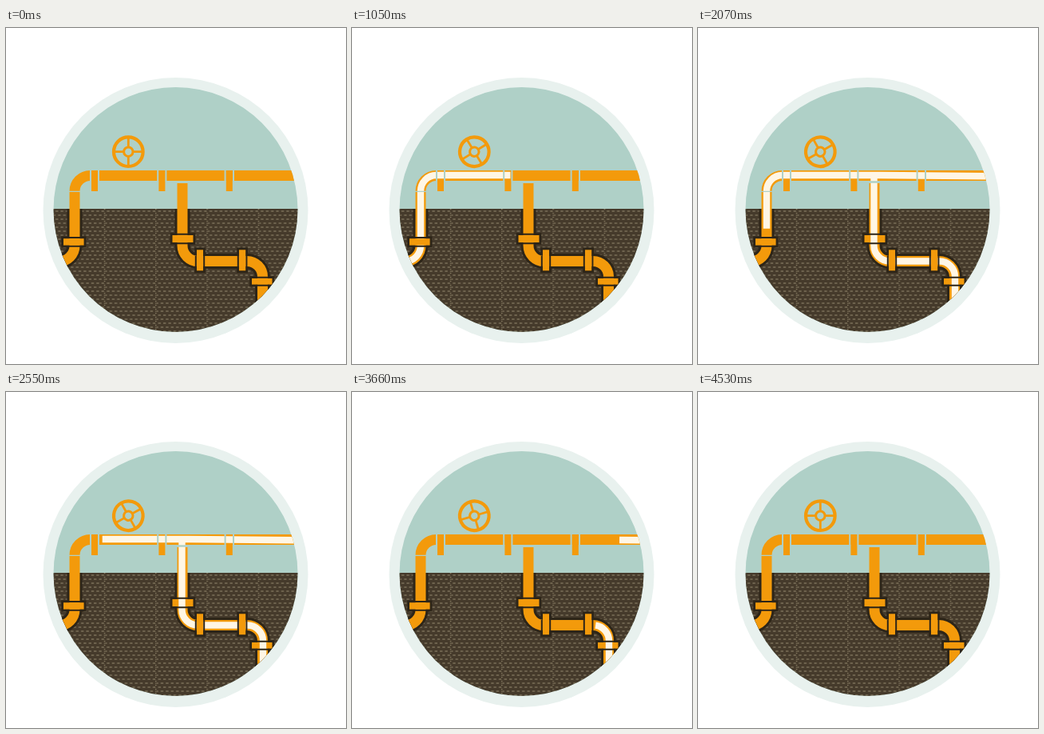
An HTML page for the animation above (4.56 s loop, 426 px wide and 420 px high).

```html
<!DOCTYPE html>
<html lang="en">
<head>
<meta charset="utf-8">
<title>Pipeline</title>
<style>
  html, body { margin: 0; width: 100%; height: 100%; overflow: hidden; background: #fff; }
  svg { display: block; width: 426px; height: 420px; }
  .pipe { fill: none; stroke: #f39a0b; stroke-width: 13; }
  .edge { fill: none; stroke: #2d2518; stroke-width: 19; }
  .rim { fill: #2d2518; }
  .flange { fill: #f39a0b; }
  .water { fill: none; stroke: #fff6e5; stroke-width: 8.4; }
  .air { stroke: #afd0c7; }
  .dark { stroke: #2d2518; }
  .air, .dark { fill: none; stroke-width: 2; }
  #wheel { fill: none; stroke: #f39a0b; }
</style>
</head>
<body>
<svg viewBox="0 0 426 420">
  <defs>
    <clipPath id="disc"><circle cx="212.5" cy="227" r="153"/></clipPath>
    <clipPath id="below"><rect y="226" width="426" height="194"/></clipPath>
    <pattern id="soil" x="60.5" y="227" width="64.3" height="10" patternUnits="userSpaceOnUse">
      <rect width="65" height="10" fill="#453a2b"/>
      <path d="M1.5 2H64M-1.7 7H64" stroke="#978b70" stroke-width="1.1" stroke-dasharray="3.4 3"/>
      <path d="M62.3 4.5h1.4M62.3 9.5h1.4" stroke="#978b70"/>
    </pattern>
    <path id="left" d="M56 292H66A20 20 0 0 0 86 272V204"/>
    <path id="branch" d="M221 194V272A19.5 19.5 0 0 0 240.5 291.5H302A19.5 19.5 0 0 1 321.5 311V345"/>
  </defs>

  <circle cx="212.5" cy="228" r="166" fill="#e8f1ee"/>
  <g clip-path="url(#disc)">
    <rect width="426" height="420" fill="#afd0c7"/>
    <rect y="226" width="426" height="194" fill="url(#soil)"/>
    <g class="edge" clip-path="url(#below)">
      <use href="#left"/><use href="#branch"/>
    </g>
    <g id="rims" class="rim"></g>
    <g class="pipe">
      <use href="#left"/><use href="#branch"/>
      <path d="M86 204A19.5 19.5 0 0 1 105.5 184.5H370"/>
    </g>
    <g id="open" class="flange"></g>
    <path id="main" class="water" d="M66 292A20 20 0 0 0 86 272V204A19.5 20 0 0 1 105.5 184H228L362 185.2"/>
    <path id="side" class="water" d="M220.5 184V272A19.5 19.5 0 0 0 240 291.5H302.5A19.5 19.5 0 0 1 322 311V345"/>
    <path class="air" d="M106 177.5V191.5M116 177.5V191.5M190.2 177.5V191.5M200.4 177.5V191.5M274.6 177.5V191.5M285 177.5V191.5"/>
    <path class="air" d="M79 204.3H93" stroke-width="1.2" style="stroke-width:1.2"/>
    <path class="air" d="M214 192.5H228" style="stroke-width:2.6"/>
    <path class="dark" d="M79 262H93M79 272.8H93M214 257.8H228M214 269.2H228M314.5 311.8H328.5M314.5 321.8H328.5M237.8 285V298M248.2 285V298M290.8 285V298M301.4 285V298"/>
    <g id="solid" class="flange"></g>
  </g>

  <g transform="translate(153.3 154.7)">
    <g id="wheel">
      <circle r="18.3" stroke-width="4.2"/>
      <circle r="5.7" stroke-width="3"/>
      <path d="M0-17V-6M0 6V17M-17 0H-6M6 0H17" stroke-width="2.8"/>
    </g>
  </g>
</svg>
<script>
  const LOOP = 4560, STEP = 30;
  const $ = id => document.getElementById(id);

  const rect = (x, y, w, h) => `<rect x="${x}" y="${y}" width="${w}" height="${h}"/>`;
  const rects = list => list.map(r => rect(...r)).join('');
  const grow = ([x, y, w, h]) => [x - 2.8, y - 2.8, w + 5.6, h + 5.6];

  const airFlanges = [107, 191.4, 275.8].map(x => [x, 178, 8, 26]);
  const openFlanges = [[208.5, 259, 26, 9], [308, 313, 25.5, 7.6]];
  const solidFlanges = [[72, 263.2, 25.6, 8.4], [239, 277.3, 8, 26], [292, 277.3, 8.2, 26]];
  $('rims').innerHTML = rects([...openFlanges, ...solidFlanges].map(grow));
  $('open').innerHTML = rects([...airFlanges, ...openFlanges]);
  $('solid').innerHTML = rects(solidFlanges);

  // [time, distance along the pipe] for both ends of each stream
  const streams = [
    { el: $('main'),
      head: [[0, 0], [540, 99.5], [600, 130.4], [1050, 223], [1620, 340.5], [1830, 388]],
      tail: [[1798, 0], [3750, 377], [3780, 388]] },
    { el: $('side'),
      head: [[1155, 0], [1830, 246]],
      tail: [[3087, 0], [3660, 183.6], [3780, 225], [3840, 246]] }
  ];

  function at(keys, t) {
    if (t <= keys[0][0]) return keys[0][1];
    for (let i = 1; i < keys.length; i++) {
      const [t0, v0] = keys[i - 1], [t1, v1] = keys[i];
      if (t <= t1) return v0 + (v1 - v0) * (t - t0) / (t1 - t0);
    }
    return keys[keys.length - 1][1];
  }

  // Same curve as cubic-bezier(.9, 0, .1, 1)
  function ease(x) {
    let lo = 0, hi = 1, u = .5;
    for (let i = 0; i < 24; i++) {
      u = (lo + hi) / 2;
      const bx = 2.7 * u * (1 - u) ** 2 + .3 * u * u * (1 - u) + u ** 3;
      if (bx < x) lo = u; else hi = u;
    }
    return u * u * (3 - 2 * u);
  }

  function draw(t) {
    for (const { el, head, tail } of streams) {
      const a = at(tail, t), b = at(head, t);
      el.style.visibility = b - a > .1 ? 'visible' : 'hidden';
      el.style.strokeDasharray = `0 ${a} ${Math.max(0, b - a)} 999`;
    }
    const swing = 1 - Math.abs(1 - 2 * t / LOOP);
    $('wheel').setAttribute('transform', `rotate(${-120 * ease(swing)})`);
  }

  const start = performance.now();
  function tick(now) {
    const t = Math.max(0, now - start) % LOOP;
    draw(Math.floor(t / STEP) * STEP);
    requestAnimationFrame(tick);
  }
  draw(0);
  requestAnimationFrame(tick);
</script>
</body>
</html>
```
